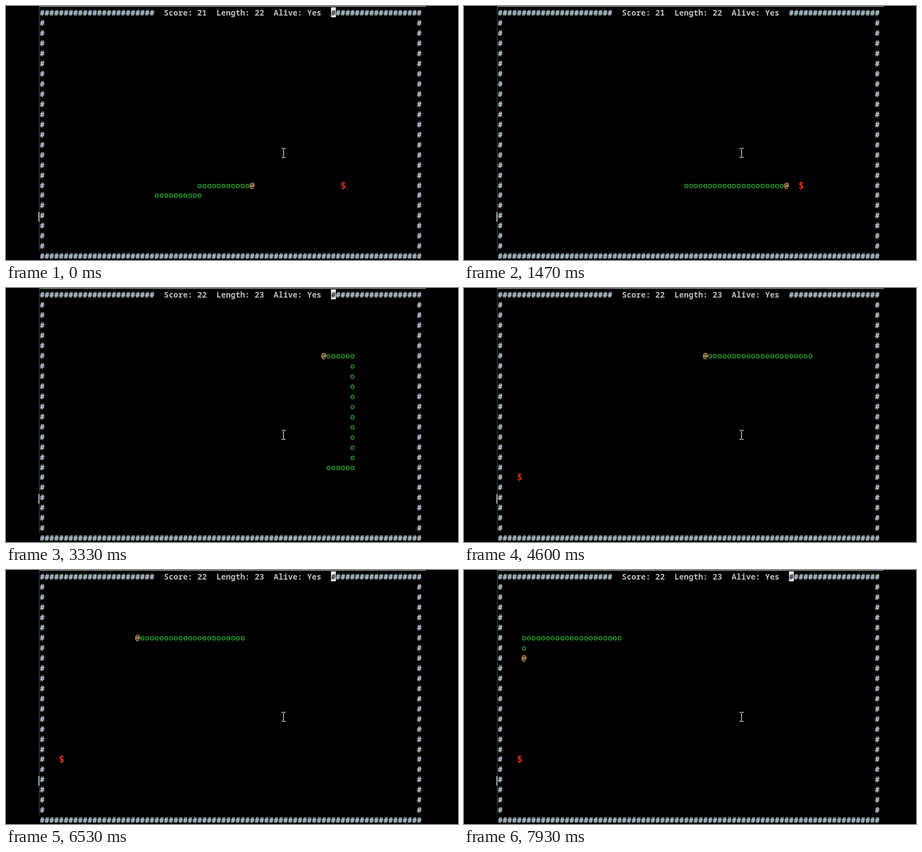
An HTML page with a canvas that plays this animation: 800x450 px, repeating every 8 s.

```html
<!DOCTYPE html>
<html lang="en">
<head>
<meta charset="utf-8">
<title>Terminal snake</title>
<style>
html, body { margin: 0; width: 100%; height: 100%; overflow: hidden; background: #000; }
canvas { display: block; filter: blur(0.4px); }
</style>
</head>
<body>
<canvas id="stage" width="800" height="450"></canvas>
<script>
const ctx = document.getElementById("stage").getContext("2d");
const LOOP = 8000, FRAME = 1000 / 15;
const COLS = 80, ROWS = 25;
const CELL_W = 8.449, CELL_H = 17.96;
const TEXT = "#bebebe", BODY = "#1f8a22", HEAD = "#e2ae6c", FOOD = "#f02a18";
const COOL = "#46708e", WARM = "#84705c";

// Game timing: the snake speeds up after it eats.
const EAT_STEP = 19, EAT_TIME = 1680, SLOW = 90, FAST = 83;
const FOOD_TIME = 3900, START = 21;
const route = trace([[24, 18], [33, 18], [33, 17], [65, 17], [65, 6], [5, 6], [5, 18]]);

function trace(corners) {
  const cells = [corners[0]];
  for (const [cx, cy] of corners.slice(1)) {
    let [x, y] = cells[cells.length - 1];
    while (x !== cx || y !== cy) {
      x += Math.sign(cx - x);
      y += Math.sign(cy - y);
      cells.push([x, y]);
    }
  }
  return cells;
}

function setFont(size) {
  ctx.font = `bold ${size}px "Noto Sans Mono", "DejaVu Sans Mono", monospace`;
}

function put(char, col, row, color, dx = 0, dy = 0) {
  ctx.fillStyle = color;
  ctx.fillText(char, 64 + col * CELL_W + dx, 17.2 + row * CELL_H + dy);
}

function write(text, col, row, color, dx) {
  [...text].forEach((char, i) => put(char, col + i, row, color, dx));
}

function box(x, y, w, h, color) {
  ctx.fillStyle = color;
  ctx.fillRect(x, y, w, h);
}

function drawWindow() {
  box(59, 0, 684, 1.5, "#858585");
  box(58.5, 0, 1, 434, "#4c5054");
  box(57.5, 365, 1.5, 17, "#dcdcdc");
}

function drawWalls(color, dx) {
  const line = "#".repeat(COLS);
  write(line.slice(0, 24), 0, 0, color, dx);
  write(line.slice(61), 61, 0, color, dx);
  write(line, 0, ROWS - 1, color, dx);
  for (let row = 1; row < ROWS - 1; row++) {
    put("#", 0, row, color, dx);
    put("#", COLS - 1, row, color, dx);
  }
}

// Two additive passes give the coloured edges of subpixel text.
function drawFringedWalls() {
  ctx.globalCompositeOperation = "lighter";
  drawWalls(COOL, -0.35);
  drawWalls(WARM, 0.35);
  ctx.globalCompositeOperation = "source-over";
}

function drawPointer() {
  box(490.5, 253, 1.4, 15, "#d0d0d0");
  for (const y of [251.5, 267.7]) {
    box(487.5, y, 3.2, 1.4, "#d0d0d0");
    box(491.8, y, 3.2, 1.4, "#d0d0d0");
  }
}

function drawSnake(step, length) {
  const head = START + step;
  for (let i = head - length + 1; i < head; i++) put("o", ...route[i], BODY);
  put("@", ...route[head], HEAD);
}

function drawFood(col, row) {
  setFont(16.5);
  put("$", col, row, FOOD, 0.7, 1);
  setFont(14);
}

function render(time) {
  const t = Math.floor((time + 4) / FRAME) * FRAME;
  const eaten = t >= EAT_TIME;
  const step = eaten
    ? EAT_STEP + Math.floor((t - EAT_TIME) / FAST)
    : Math.floor((t + 30) / SLOW);
  const score = eaten ? 22 : 21;

  box(0, 0, 800, 450, "#000");
  setFont(14);
  ctx.textAlign = "center";
  drawWindow();
  drawFringedWalls();
  write(`Score: ${score}  Length: ${score + 1}  Alive: Yes`, 26, 0, TEXT);

  // Blinking terminal cursor
  if ((t + 100) % 1600 < 800) {
    box(575.3, 2.5, 8.4, 17.5, "#f8f8f8");
    put("#", 61, 0, "#2c2c2c");
  }

  if (!eaten) drawFood(63, 17);
  else if (t >= FOOD_TIME) drawFood(4, 18);
  drawSnake(step, score + 1);
  drawPointer();
}

function tick() {
  render(performance.now() % LOOP);
  requestAnimationFrame(tick);
}
tick();
</script>
</body>
</html>
```
